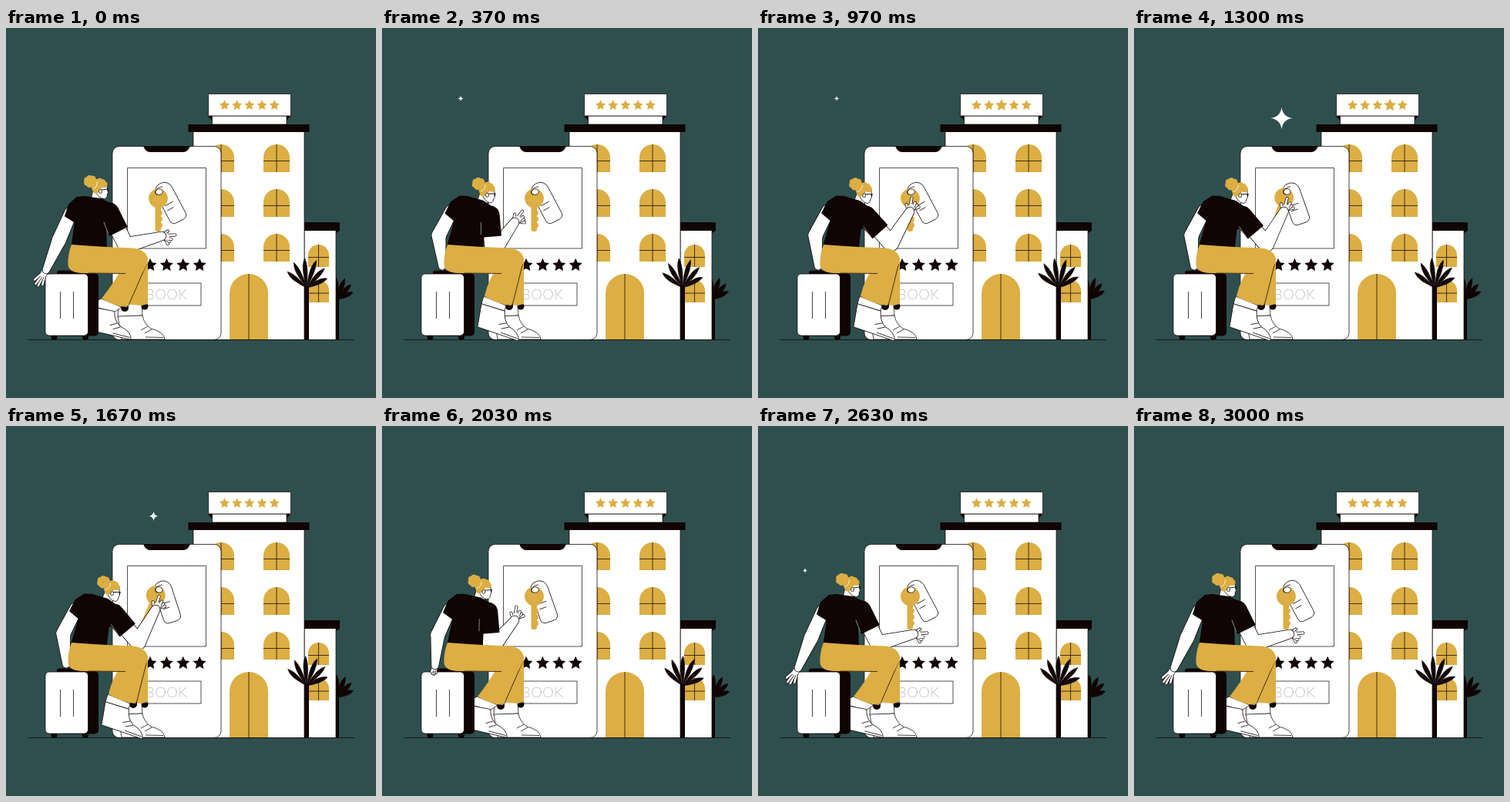
Animation, 480 px wide and 480 px high, one loop 3030 ms. Source, as an HTML page with a canvas:

```html
<!DOCTYPE html>
<html lang="en">
<head>
<meta charset="utf-8">
<title>Hotel booking</title>
<style>
  html, body { margin: 0; width: 100%; height: 100%; overflow: hidden; background: #2f4f4f; }
  canvas { display: block; width: 480px; height: 480px; }
</style>
</head>
<body>
<canvas id="stage"></canvas>
<script>
const LOOP = 3030, TAU = Math.PI * 2, RAD = Math.PI / 180;
const BG = '#2f4f4f', GOLD = '#dcae43', INK = '#100404', WHITE = '#fff';
const cv = document.getElementById('stage');
const c = cv.getContext('2d');
const dpr = window.devicePixelRatio || 1;
cv.width = cv.height = 480 * dpr;

const mix = (a, b, p) => a + (b - a) * p;
const bump = p => p > 0 && p < 1 ? Math.sin(Math.PI * p) : 0;
const ease = (a, b, t) => {
  const p = Math.min(1, Math.max(0, (t - a) / (b - a)));
  return p * p * (3 - 2 * p);
};
// Rises from a to b, holds, falls from d to e.
const hold = (t, a, b, d, e) => ease(a, b, t) - ease(d, e, t);

function paint(fill, line, width = 0.75) {
  if (fill) { c.fillStyle = fill; c.fill(); }
  if (line) { c.strokeStyle = line; c.lineWidth = width; c.stroke(); }
}
function poly(p, closed = true) {
  c.beginPath();
  for (let i = 0; i < p.length; i += 2) c.lineTo(p[i], p[i + 1]);
  if (closed) c.closePath();
}
function box(x, y, w, h, r, fill, line, width) {
  c.beginPath();
  c.roundRect(x, y, w, h, r);
  paint(fill, line, width);
}
function seg(x1, y1, x2, y2, color = INK, width = 0.75) {
  poly([x1, y1, x2, y2], false);
  paint(null, color, width);
}
function dot(x, y, r, fill, line, ry = r) {
  c.beginPath();
  c.ellipse(x, y, r, ry, 0, 0, TAU);
  paint(fill, line);
}
function star(x, y, r, fill) {
  c.beginPath();
  for (let i = 0; i < 10; i++) {
    const q = i % 2 ? r * 0.48 : r, a = i * TAU / 10;
    c.lineTo(x + q * Math.sin(a), y - q * Math.cos(a));
  }
  c.closePath();
  paint(fill);
}
function placed(x, y, angle, draw) {
  c.save();
  c.translate(x, y);
  c.rotate(angle);
  draw();
  c.restore();
}

function arch(cx, top, r, bottom, bar) {
  box(cx - r, top, r * 2, bottom - top, [r, r, 0, 0], GOLD);
  seg(cx, top, cx, bottom);
  if (bar) seg(cx - r, bar, cx + r, bar);
}

function palm(x, y, size, count, sway) {
  for (let i = 0; i < count; i++) {
    const p = i / (count - 1), len = size * (0.74 + 0.3 * bump(p * 0.8 + 0.15));
    placed(x, y, (mix(-52, 64, p) + sway) * RAD, () => {
      c.beginPath();
      c.moveTo(0, 0);
      c.bezierCurveTo(-2, -len * 0.35, -6, -len * 0.7, 0, -len);
      c.bezierCurveTo(4, -len * 0.7, 2, -len * 0.35, 0, 0);
      paint(INK, INK, 0.6);
    });
  }
}

function hotel(t, sway) {
  palm(430, 352, 28, 6, sway);
  box(427.5, 349, 4.5, 55.5, 0, INK);

  box(387, 262, 41, 142.5, 0, WHITE, INK);
  poly([386, 252, 433, 252, 433, 263, 428, 266, 428, 263, 386, 263]);
  paint(INK);
  arch(405.5, 281, 13.5, 310, 297.5);
  arch(405.5, 327, 13.5, 356, 344);

  box(243, 134, 144, 270.5, 0, WHITE, INK);
  box(236.5, 125, 157, 10, 0, INK);
  poly([262, 114, 369.5, 114, 364, 120, 267, 120]);
  paint(INK);
  box(267.5, 114, 96.5, 11, 0, WHITE, INK);
  box(262.5, 85.5, 107, 28.5, 0, WHITE, INK);
  for (let i = 0; i < 5; i++)
    star(283.5 + i * 16.2, 100.3, 7 + 2.6 * bump((t - 540 - i * 200) / 200), GOLD);

  for (let y = 151; y < 270; y += 58) for (const x of [279, 351])
    arch(x, y, 17, y + 36, y + 21.5);
  arch(315, 319, 25, 404, 0);

  box(387, 334, 6, 70.5, 0, INK);
  palm(390, 337, 37, 6, sway);
}

function phone() {
  box(138, 153.5, 141, 251, 9, WHITE, INK);
  c.beginPath();
  c.moveTo(178, 153);
  c.quadraticCurveTo(181, 161, 187, 161);
  c.lineTo(230, 161);
  c.quadraticCurveTo(236, 161, 239, 153);
  paint(INK);
  box(157.5, 181.5, 102, 104.5, 0, WHITE, INK, 0.7);
  for (let i = 0; i < 4; i++) star(187 + i * 21.4, 307.7, 9, INK);
  box(163.5, 331, 89.5, 29, 0, WHITE, INK, 0.7);
  c.fillStyle = INK;
  c.font = '200 18px Lato, sans-serif';
  c.letterSpacing = '1px';
  c.textAlign = 'center';
  c.fillText('BOOK', 208.5, 352.3);
}

function keyring(t, swing) {
  const tilt = 10 * hold(t, 970, 1400, 1900, 2450);
  placed(201, 204, (tilt - 28) * RAD, () => {
    box(-11.5, -2.5, 23, 55, [11, 11, 6, 6], WHITE, INK);
    seg(-8, 26, 4, 26);
    seg(-8, 33, 1, 33);
  });
  placed(199, 212, 22 * swing * RAD, () => {
    box(-5.5, 14, 7.5, 38, [0, 0, 3, 3], GOLD);
    for (let y = 28; y < 50; y += 8) dot(1.5, y, 2.4, GOLD, null, 3.2);
    dot(-1.5, 9, 12.4, GOLD);
    dot(-0.5, 0.5, 4.8, WHITE, INK, 3.8);
  });
  c.beginPath();
  c.ellipse(200, 211, 7, 4, -0.6, 2.6, 5.6);
  paint(null, INK);
}

// Boot hanging from the middle of its sock line.
function boot(x, y, angle) {
  placed(x, y, angle * RAD, () => {
    c.beginPath();
    c.moveTo(-16, 0);
    c.lineTo(16, -1);
    c.quadraticCurveTo(18, 10, 27, 16);
    c.quadraticCurveTo(44, 20, 45, 30);
    c.lineTo(-11, 30);
    c.quadraticCurveTo(-13, 16, -16, 0);
    c.closePath();
    paint(WHITE, INK);
    seg(14, 18, 23, 13);
    seg(19, 22, 28, 17);
    seg(20, 27, 43, 27.5);
  });
}

function legs(back) {
  const at = (front, rear) => mix(front, rear, back);
  // planted leg
  poly([146, 356, 176, 356, 177, 373, 145, 375]);
  paint(WHITE, INK);
  boot(161, 374, 0);
  dot(180, 361, 4.5, INK);
  poly([155, 305, 184, 298, 184, 358, 176, 360, 154, 358]);
  paint(GOLD);

  // leg that slides back under the seat
  const lx = at(133, 124), ly = at(348, 351), rx = at(168, 157), ry = at(360, 362);
  const fx = at(144, 125), fy = at(363, 365), turn = at(19, 13);
  dot(rx - 3, ry + 1, 5, INK);
  poly([lx - 1, ly, rx - 7, ry, fx + 15, fy + 4, fx - 15, fy - 5]);
  paint(WHITE, INK);
  boot(fx, fy, turn);
  c.beginPath();
  c.moveTo(152, 308);
  c.quadraticCurveTo(at(138, 144), 325, lx, ly);
  c.quadraticCurveTo((lx + rx) / 2 - 2, (ly + ry) / 2 + 4, rx, ry);
  c.lineTo(184, 300);
  paint(GOLD);
  seg(182.5, 306, rx + 1, ry);
}

function suitcase() {
  dot(62.5, 401, 4, INK);
  dot(103, 401, 4, INK);
  box(66, 314.5, 28, 8, 3, INK);
  box(72, 318, 48, 81.5, 5, INK);
  box(51, 319, 55.5, 80, 5, WHITE, INK);
  for (const x of [70.5, 87.5]) seg(x, 342, x, 377);
}

// Two tapered bones; the elbow bends to the given side.
function arm(sx, sy, wx, wy, upper, lower, side, radii) {
  const dx = wx - sx, dy = wy - sy, d = Math.hypot(dx, dy);
  const a = d < upper + lower ? (upper ** 2 - lower ** 2 + d * d) / (2 * d) : d * upper / (upper + lower);
  const h = d < upper + lower ? side * Math.sqrt(Math.max(0, upper ** 2 - a * a)) : 0;
  const ex = sx + (dx * a - dy * h) / d, ey = sy + (dy * a + dx * h) / d;
  const bone = (x, y, u, v, r, s) => {
    const k = Math.atan2(v - y, u - x), q = Math.PI / 2;
    c.beginPath();
    c.arc(x, y, r, k + q, k - q);
    c.arc(u, v, s, k - q, k + q);
    c.closePath();
  };
  for (const pass of [[null, INK, 1.5], [WHITE]]) {
    bone(sx, sy, ex, ey, radii[0], radii[1]);
    paint(...pass);
    bone(ex, ey, wx, wy, radii[1], radii[2]);
    paint(...pass);
  }
  return Math.atan2(ey - sy, ex - sx);
}
function finger(x, y, u, v, w) {
  c.lineCap = 'round';
  seg(x, y, u, v, INK, w + 1.4);
  seg(x, y, u, v, WHITE, w);
  c.lineCap = 'butt';
}
function openHand(x, y, dir, size) {
  placed(x, y, dir * RAD, () => {
    for (let i = -1.5; i < 2; i++)
      finger(4 * size, i, (23 - i * i * 2) * size, i * 4 * size, 2.6);
    dot(5 * size, 0, 3 + 3 * size, WHITE, null, 4);
  });
}
function pointingHand(x, y, dir) {
  placed(x, y, dir * RAD, () => {
    finger(2, -3, 8, -6.5, 2.6);
    for (let i = 0; i < 3; i++) finger(5, 5 - i, 8 + i * 2.2, 10 - i * 3, 2.8);
    finger(5, -1, 17.5, -1.5, 2.6);
    dot(4, 0.5, 6, WHITE, null, 4.5);
  });
}

const HIP = [107, 284];
// Where a point of the upright torso lands once it leans.
function leaned(x, y, angle) {
  const dx = x - HIP[0], dy = y - HIP[1], k = Math.cos(angle), s = Math.sin(angle);
  return [HIP[0] + dx * k - dy * s, HIP[1] + dx * s + dy * k];
}
function torsoFrame(angle, draw) {
  placed(...HIP, angle, () => {
    c.translate(-HIP[0], -HIP[1]);
    draw();
  });
}

function shirt(angle, shoulder, armAngle) {
  c.lineJoin = 'round';
  torsoFrame(angle, () => {
    poly([101, 219, 123, 222, 139, 230, 137, 248, 129, 258, 130, 290,
      85, 288, 90, 252, 77, 244, 82, 229, 92, 220]);
    paint(INK, INK, 2);
  });
  placed(...shoulder, armAngle, () => {
    box(-12, -12, 39, 25, [12, 0, 0, 12], INK, INK, 1.5);
    seg(8, 12, 24, 13.6, WHITE, 0.5);
  });
  c.lineJoin = 'miter';
}

function neck() {
  poly([113, 210, 125, 216, 124, 227, 109, 227]);
  paint(WHITE, INK);
}
function head() {
  c.beginPath();
  c.moveTo(118, 203);
  c.lineTo(130.5, 203);
  c.lineTo(132.5, 213);
  c.quadraticCurveTo(131, 215, 131, 219);
  c.quadraticCurveTo(129, 224, 121, 219);
  c.lineTo(116, 213);
  paint(WHITE, INK);
  for (let i = 0; i < 7; i++) {
    const a = i * TAU / 7;
    dot(109.5 + 4.8 * Math.cos(a), 199 + 4.2 * Math.sin(a), 4, GOLD);
    const b = mix(140, 335, i / 6) * RAD;
    dot(121.5 + 6.5 * Math.cos(b), 206 + 7 * Math.sin(b), 4.2, GOLD);
  }
  dot(120, 205, 5, GOLD);
  c.beginPath();
  c.arc(109, 200, 9.5, -0.1, 1.1);
  paint(null, WHITE, 0.8);
  dot(122.5, 212, 2, WHITE, INK, 2.6);
  seg(124, 210, 133, 208.8, INK, 0.9);
  seg(132.5, 208.5, 132, 212, INK, 1.2);
}

function thigh() {
  c.beginPath();
  c.moveTo(85, 281);
  c.quadraticCurveTo(105, 282.5, 130, 284);
  c.lineTo(164, 285.5);
  c.quadraticCurveTo(184, 287, 184, 303);
  c.lineTo(178, 316);
  c.lineTo(155, 319);
  c.lineTo(98, 318);
  c.quadraticCurveTo(81, 317, 80.5, 307);
  c.quadraticCurveTo(80, 294, 85, 281);
  paint(GOLD);
  seg(107, 318, 155, 318.5);
}

function sparkle(x, y, r) {
  if (r < 0.3) return;
  c.beginPath();
  c.moveTo(x, y - r);
  for (let i = 1; i <= 4; i++) {
    const a = i * TAU / 4, b = a - TAU / 8, q = r * 0.16;
    c.quadraticCurveTo(x + q * Math.sin(b), y - q * Math.cos(b),
      x + r * Math.sin(a), y - r * Math.cos(a));
  }
  paint(WHITE);
}

function woman(t, swing) {
  const angle = 8.5 * RAD * hold(t, 0, 450, 1650, 2450);
  const nod = hold(t, 0, 450, 1850, 2450);
  const prop = hold(t, 0, 370, 1850, 2300);
  const lift = hold(t, 0, 370, 2030, 2400);
  const touch = hold(t, 370, 640, 1670, 2030);
  const wrist = hold(t, 370, 640, 2030, 2400);

  legs(1 - hold(t, 0, 350, 1690, 2030));
  suitcase();

  const fx = mix(52, 78, prop), fy = mix(314, 309, prop);
  openHand(fx, fy, mix(122, 90, prop), mix(1, 0.2, prop));
  arm(...leaned(84, 240, angle), fx, fy, 36, 40, 1, [8, 9, 4.5]);

  const shoulder = leaned(134, 239, angle);
  const hx = 202 - 30 * lift + 25 * touch - 3 * swing;
  const hy = 270 - 18 * lift - 14 * touch;
  pointingHand(hx, hy, -50 * lift - 27 * wrist + 7 * swing);
  const armAngle = arm(...shoulder, hx, hy, 48, 48, 1, [10, 10, 5.5]);

  const onHead = draw => torsoFrame(angle, () => {
    c.translate(5 * nod, 1.5 * nod);
    draw();
  });
  onHead(neck);
  shirt(angle, shoulder, armAngle);
  onHead(head);
  thigh();
}

function draw(t) {
  c.setTransform(dpr, 0, 0, dpr, 0, 0);
  c.fillStyle = BG;
  c.fillRect(0, 0, 480, 480);

  const swing = hold(t, 970, 1400, 1670, 2030);
  hotel(t, 2 - 5 * Math.sin(t / LOOP * TAU));
  phone();
  keyring(t, swing);
  seg(28, 404.5, 452, 404.5);
  woman(t, swing);

  sparkle(102, 91.5, 16 * bump((t - 320) / 700));
  sparkle(191.5, 117, 16 * bump((t - 1055) / 700));
  sparkle(61, 187.5, 6.5 * bump((t - 2050) / 700));
}

const start = performance.now();
function frame() {
  draw((performance.now() - start) % LOOP);
  requestAnimationFrame(frame);
}
frame();
</script>
</body>
</html>
```
